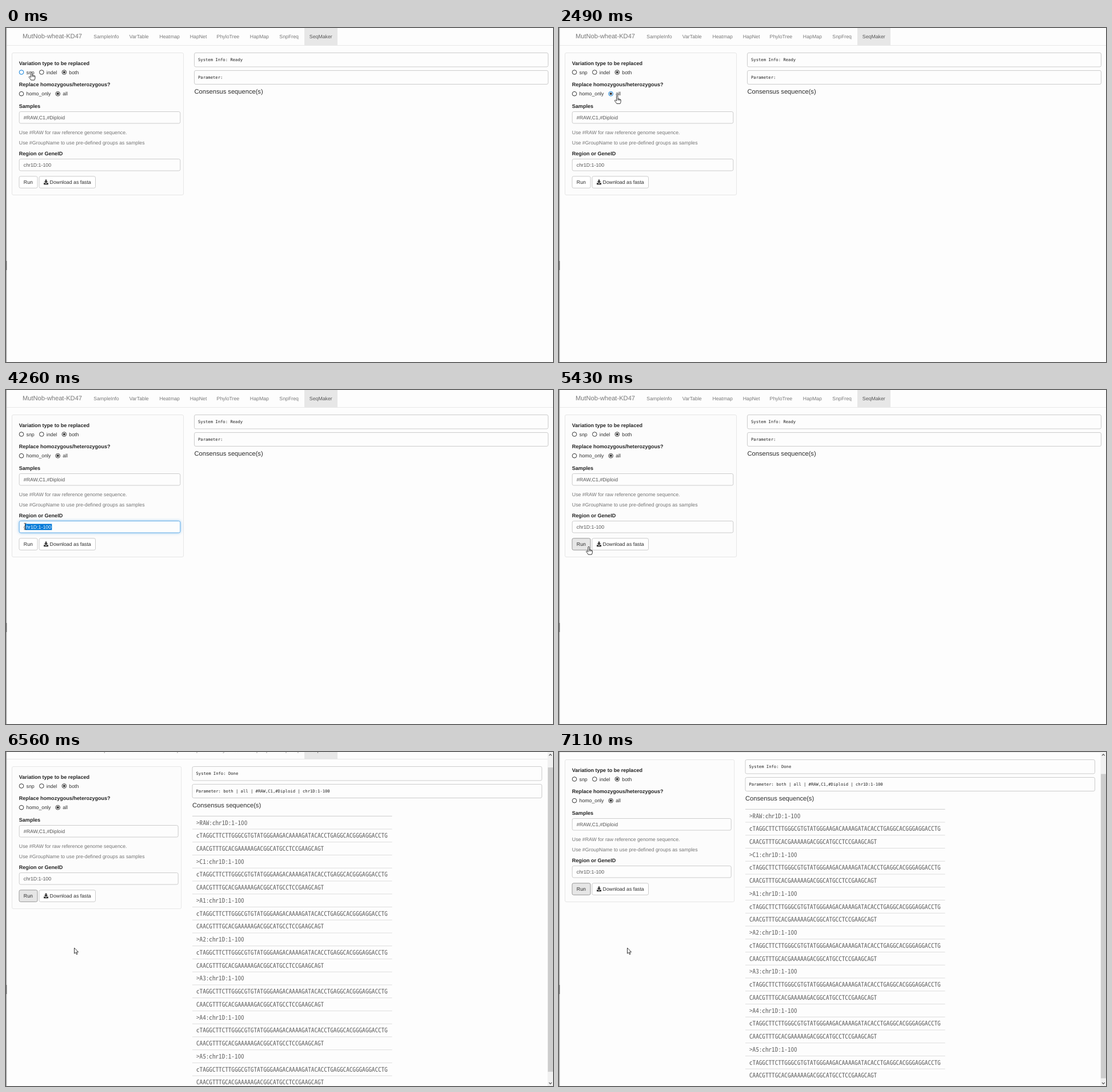
An HTML page that plays this animation: 957 px wide and 585 px high, repeating every 7.17 s.

```html
<!DOCTYPE html>
<html lang="en">
<head>
<meta charset="utf-8">
<title>Sequence maker</title>
<style>
  html, body { margin: 0; width: 100%; height: 100%; overflow: hidden; background: #fdfdfd; }
  svg { display: block; width: 100%; height: 100%; }
  text { font: 8.78px "Liberation Sans", Arial, sans-serif; fill: #2c2c2c; white-space: pre; text-rendering: geometricPrecision; }
  .nav { fill: #777; }
  .brand { font-size: 11.15px; fill: #777; }
  .tab { fill: #555; }
  .bold { font-size: 9.05px; font-weight: bold; fill: #222; }
  .help { fill: #737373; }
  .value { fill: #555; }
  .picked { fill: #fff; }
  .head { font-size: 11.15px; }
  .mono { font: 7.21px "DejaVu Sans Mono", monospace; fill: #222; }
  .seq { font: 11.16px "Noto Sans Mono CJK SC", "Noto Sans Mono CJK JP", monospace; font-weight: 300; fill: #626262; }
  .box { fill: #fdfdfd; stroke: #ccc; }
  .well { fill: #fcfcfc; stroke: #e6e6e6; }
  .focus { stroke: #66afe9; filter: drop-shadow(0 0 2.5px rgba(102, 175, 233, .7)); }
  .ring { fill: #fff; stroke: #333; }
  .ring.hot { stroke: #0078d7; }
  .btn { fill: #fff; stroke: #ccc; }
  .btn.down { fill: #e6e6e6; stroke: #999; }
  .cursor path { fill: #fff; stroke: #222; stroke-width: .9; stroke-linejoin: round; }
</style>
</head>
<body>
<svg id="stage" viewBox="0 0 957 585" xmlns="http://www.w3.org/2000/svg"></svg>
<script>
const LOOP = 7170;
const RESULT_AT = 5490;

// Pointer hotspot: time, x, y
const POINTER = [
  [370, 44.5, 78], [1040, 92, 80], [1160, 115, 79], [1410, 115, 79],
  [1650, 63, 108], [1780, 50, 114], [2070, 48, 115], [2450, 102, 115],
  [2790, 100, 151], [2850, 103, 154], [3160, 5, 149], [3300, 5, 149],
  [3960, 86, 241], [4020, 86, 241], [4360, 12, 238], [4690, 52, 276],
  [4930, 52, 275], [6110, 52, 275], [6430, 119, 342], [6560, 119.5, 343]
];
const SCROLL = [[6370, 0], [6430, 1], [6490, 8], [6560, 18], [6620, 25], [6680, 30]];

const RADIOS = [
  { label: 'snp', x: 27, y: 77.5, end: 50 },
  { label: 'indel', x: 62.3, y: 77.5, end: 94 },
  { label: 'both', x: 101.8, y: 77.5, end: 128, on: true },
  { label: 'homo_only', x: 27, y: 115.2, end: 79 },
  { label: 'all', x: 90.7, y: 115.2, end: 109, on: true }
];
const INPUTS = [
  { id: 'samples', y: 146.5, value: '#RAW,C1,#Diploid', end: 102.6, from: 2850, dragEnd: 3160, to: 4020 },
  { id: 'region', y: 229.5, value: 'chr1D:1-100', end: 80.3, from: 4020, dragEnd: 4360, to: 4810 }
];

const text = (x, y, str, cls = '') =>
  `<text x="${x}" y="${y}" class="${cls}">${str.replace(/>/g, '&gt;')}</text>`;
const rect = (x, y, w, h, cls, extra = '') =>
  `<rect x="${x}" y="${y}" width="${w}" height="${h}" rx="2.5" class="${cls}" ${extra}/>`;
const line = (x1, x2, y, color) =>
  `<path d="M${x1},${y}H${x2}" stroke="${color}"/>`;

function navBar() {
  const tabs = [['SampleInfo', 153.3], ['VarTable', 215.8], ['Heatmap', 268.4], ['HapNet', 321.7],
    ['PhyloTree', 368.6], ['HapMap', 426.8], ['SnpFreq', 478.3]];
  return line(1, 957, 30.5, '#e7e7e7') +
    '<rect x="522" y="-1" width="58" height="31" fill="#e7e7e7"/>' +
    text(29, 18.3, 'MutNob-wheat-KD47', 'brand') +
    tabs.map(([name, x]) => text(x, 17.5, name, 'nav')).join('') +
    text(530.8, 17.5, 'SeqMaker', 'tab');
}

function radio({ label, x, y, on }, i) {
  return `<circle id="radio${i}" class="ring" cx="${x}" cy="${y}" r="3.8"/>` +
    (on ? `<circle cx="${x}" cy="${y}" r="2.1" fill="#333"/>` : '') +
    text(x + 8.5, y + 3, label);
}

function field({ id, y, value }) {
  return rect(23.2, y, 281.6, 20.5, 'box', `id="${id}"`) +
    text(30.8, y + 13.2, value, 'value') +
    `<clipPath id="${id}Clip"><rect id="${id}Cut" y="${y + 5}" height="10.8"/></clipPath>` +
    `<g clip-path="url(#${id}Clip)"><rect x="23" y="${y}" width="120" height="20" fill="#0078d7"/>` +
    text(30.8, y + 13.2, value, 'picked') + '</g>';
}

function form() {
  return rect(10.5, 43.5, 300, 249, 'well', 'id="well"') +
    text(22.8, 65, 'Variation type to be replaced', 'bold') +
    text(22.8, 102.3, 'Replace homozygous/heterozygous?', 'bold') +
    RADIOS.map(radio).join('') +
    text(22.8, 140, 'Samples', 'bold') +
    text(22.8, 185.8, 'Use #RAW for raw reference genome sequence.', 'help') +
    text(22.8, 204.4, 'Use #GroupName to use pre-defined groups as samples', 'help') +
    text(22.8, 222.8, 'Region or GeneID', 'bold') +
    INPUTS.map(field).join('') +
    rect(23, 259.8, 32, 20.5, 'btn', 'id="run"') + text(30.8, 273.2, 'Run') +
    rect(58, 259.8, 98.5, 20.5, 'btn') + text(76.6, 273.2, 'Download as fasta') +
    '<path d="M68.8,265.5h2.4v3h2.2l-3.4,3.6l-3.4-3.6h2.2z M66,271.3h2l2,1.8l2-1.8h2v3h-8z" fill="#333"/>';
}

function output(x, width, info, params) {
  return rect(x, 43.5, width, 24.5, 'box') + text(x + 6.5, 58.4, info, 'mono') +
    rect(x, 74.5, width, 24, 'box') + text(x + 6.5, 89.3, params, 'mono') +
    text(x, 114.8, 'Consensus sequence(s)', 'head');
}

function table() {
  const rows = ['RAW', 'C1', 'A1', 'A2', 'A3', 'A4', 'A5'].flatMap(name => [
    `>${name}:chr1D:1-100`,
    'cTAGGCTTCTTGGGCGTGTATGGGAAGACAAAAGATACACCTGAGGCACGGGAGGACCTG',
    'CAACGTTTGCACGAAAAAGACGGCATGCCTCCGAAGCAGT'
  ]);
  return rows.map((row, i) => {
    const y = 130.3 + i * 22.74;
    return line(326, 675.5, y, i ? '#ddd' : '#ccc') + text(333, y + 15.2, row, 'seq');
  }).join('');
}

const cursors = {
  arrow: '<path d="M0,0V10L2.3,7.9L3.9,11.6L5.5,10.9L3.9,7.3H7Z"/>',
  hand: '<path d="M-1.2,8V.6Q-1.2-.6 0-.6Q1.2-.6 1.2,.6V4.6Q2.6,4 3,5Q4.4,4.5 4.8,5.6Q6.4,5.3 6.4,6.8V9Q6.4,11 5.2,13.2H-.8Q-2,11-4.3,8.4Q-4.6,7-3.2,7Q-2,7.4-1.2,8.6Z"/><path d="M1.2,4.6V7.5M3,5V7.5M4.8,5.6V7.7"/>',
  beam: '<path d="M-2-5.5H-.6L0-5L.6-5.5H2M0-5V5M-2,5.5H-.6L0,5L.6,5.5H2" style="fill:none"/>',
  resize: '<path d="M-4.5,0L-1.5-2.8V-1H1.8V-2.8L4.8,0L1.8,2.8V1H-1.5V2.8Z"/>'
};

const stage = document.getElementById('stage');
stage.innerHTML =
  '<rect width="957" height="585" fill="#fdfdfd"/>' +
  `<g id="page">${navBar()}${form()}` +
  `<g id="ready">${output(329.5, 619, 'System Info: Ready', 'Parameter:')}</g>` +
  `<g id="done">${output(326, 611.5, 'System Info: Done', 'Parameter: both | all | #RAW,C1,#Diploid | chr1D:1-100')}${table()}</g></g>` +
  '<g id="bar"><rect x="947.5" width="10" height="585" fill="#f1f1f1"/>' +
  '<rect id="thumb" x="948" width="9" height="533" fill="#cdcdcd"/>' +
  '<path d="M950,6.3L952.4,3.9L954.8,6.3M950,578.9L952.4,581.3L954.8,578.9" fill="none" stroke="#505050" stroke-width="1.2"/></g>' +
  '<rect width="1.3" height="585" fill="#a6a6a6"/><rect y="408" width="1.3" height="16" fill="#666"/>' +
  '<g id="cursor" class="cursor">' +
  Object.entries(cursors).map(([name, d]) => `<g id="${name}">${d}</g>`).join('') + '</g>';

const el = id => document.getElementById(id);
const show = (id, on) => el(id).setAttribute('display', on ? 'inline' : 'none');
const clamp = (v, lo, hi) => Math.min(hi, Math.max(lo, v));

// Interpolates the columns of a [time, ...values] list
function sample(keys, t) {
  const next = keys.findIndex(k => k[0] > t);
  if (next === 0) return keys[0].slice(1);
  if (next < 0) return keys[keys.length - 1].slice(1);
  const a = keys[next - 1], b = keys[next];
  const k = (t - a[0]) / (b[0] - a[0]);
  return a.slice(1).map((v, i) => v + (b[i + 1] - v) * k);
}

function cursorAt(x, y, onLabel, onRun) {
  if (onLabel || onRun) return 'hand';
  if (x < 8) return 'resize';
  const inField = INPUTS.some(f => x > 23 && x < 305 && y > f.y && y < f.y + 20.5);
  const onHelp = x > 22 && x < 243 && y > 178 && y < 207;
  return inField || onHelp ? 'beam' : 'arrow';
}

function draw(t) {
  const [x, y] = sample(POINTER, t);
  const scroll = Math.round(sample(SCROLL, t)[0]);
  const done = t >= RESULT_AT;

  const hot = RADIOS.findIndex(r => x > r.x - 4 && x < r.end && Math.abs(y - r.y) < 6);
  RADIOS.forEach((r, i) => el('radio' + i).classList.toggle('hot', i === hot));

  for (const f of INPUTS) {
    const active = t >= f.from && t < f.to;
    const start = t < f.dragEnd ? clamp(x, 30.6, f.end) : 30.6;
    el(f.id).classList.toggle('focus', active);
    el(f.id).setAttribute('width', done ? 278 : 281.6);
    el(f.id + 'Cut').setAttribute('x', start);
    el(f.id + 'Cut').setAttribute('width', active ? f.end - start : 0);
  }

  const onRun = x > 23 && x < 55 && y > 260 && y < 280.5;
  el('run').classList.toggle('down', onRun || t >= 4810);

  el('well').setAttribute('width', done ? 296.2 : 300);
  show('ready', !done);
  show('done', done);
  show('bar', done);
  el('done').setAttribute('opacity', clamp(.3 + .7 * (t - RESULT_AT) / 250, .3, 1));
  el('page').setAttribute('transform', `translate(0 ${-scroll})`);
  el('thumb').setAttribute('y', 10 + scroll * .95);

  const kind = cursorAt(x, y, hot >= 0, onRun);
  Object.keys(cursors).forEach(name => show(name, name === kind));
  el('cursor').setAttribute('transform', `translate(${x} ${y})`);
}

const began = performance.now();
function tick() {
  draw((performance.now() - began) % LOOP);
  requestAnimationFrame(tick);
}
tick();
</script>
</body>
</html>
```
